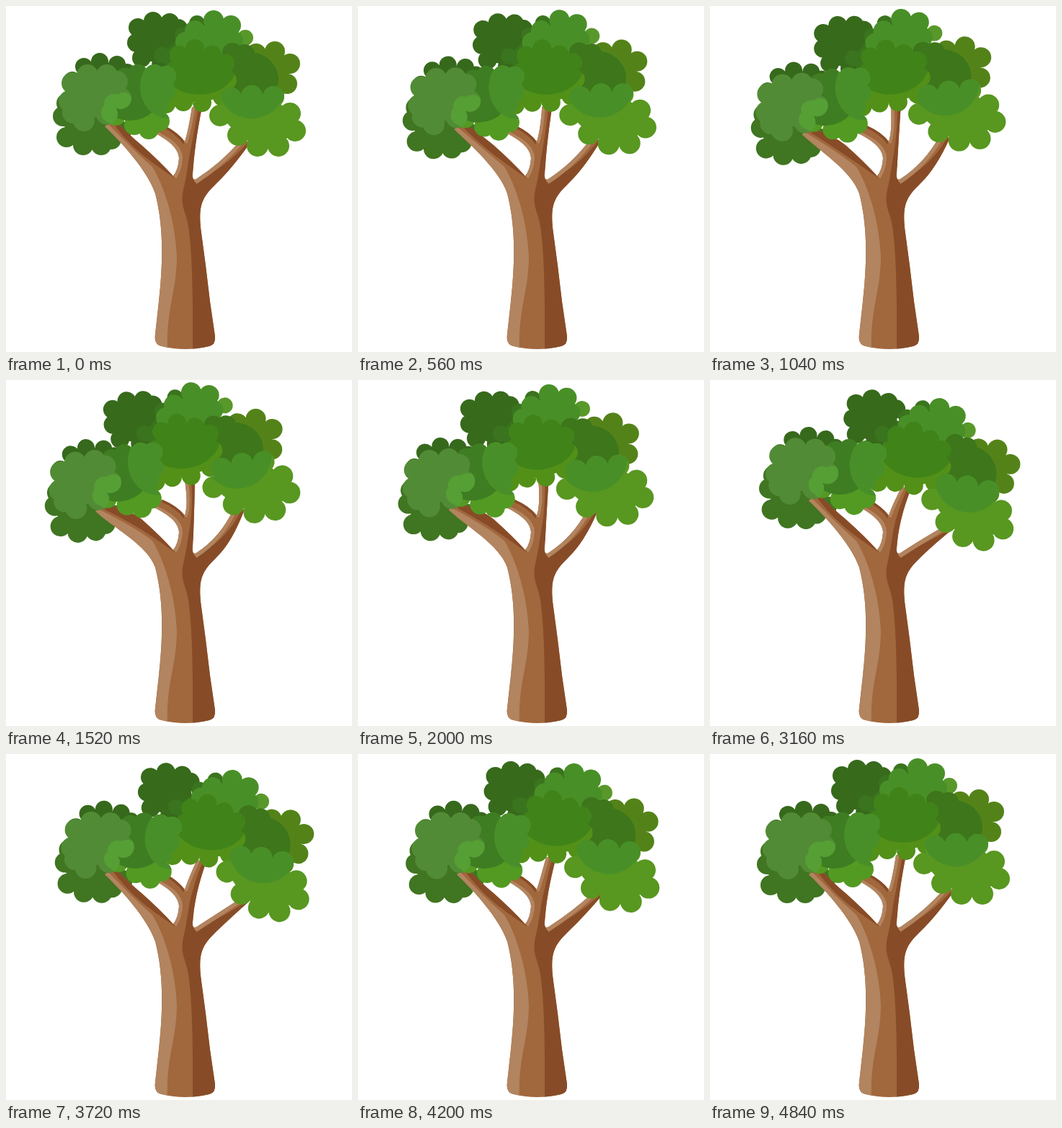
These frames come from a looping animation (480 by 480 pixels, 5 s). An HTML page with a canvas:

```html
<!DOCTYPE html>
<html lang="en">
<head>
<meta charset="utf-8">
<title>Swaying tree</title>
<style>
  html, body { margin: 0; width: 100%; height: 100%; overflow: hidden; background: #fff; }
  canvas { display: block; width: 480px; height: 480px; }
</style>
</head>
<body>
<canvas id="stage" width="480" height="480"></canvas>
<script>
const ctx = document.getElementById('stage').getContext('2d');
const LOOP = 5000, LEFT_AT = 1600, RIGHT_AT = 3300, REST_AT = 4840;

// Leaf mass: lobe centres listed clockwise, all with the same radius.
function cloud(r, ...xy) {
  const path = new Path2D();
  for (let i = 0; i < xy.length; i += 2) path.lineTo(xy[i], xy[i + 1]);
  path.closePath();
  for (let i = 0; i < xy.length; i += 2) {
    path.moveTo(xy[i] + r, xy[i + 1]);
    path.arc(xy[i], xy[i + 1], r, 0, 7);
  }
  return path;
}

function oval(x, y, rx, ry) {
  const path = new Path2D();
  path.ellipse(x, y, rx, ry, 0, 0, 7);
  return path;
}

// Pivot, then [dx, dy, angle] when blown left and right.
const groups = {
  back:   { x: 212, y: 50,  left: [-33, 7, -.13],   right: [18, 6, .12] },
  top:    { x: 288, y: 45,  left: [-28, -3, -.13],  right: [27, 19, .17] },
  centre: { x: 265, y: 90,  left: [-21, 0, -.13],   right: [17, 12, .13] },
  right:  { x: 362, y: 90,  left: [-23, -8, -.13],  right: [22, 32, .17] },
  low:    { x: 349, y: 160, left: [-9, -10, -.13],  right: [9, 24, .2] },
  middle: { x: 185, y: 135, left: [-14, 8, -.12],   right: [6, 1, .1] },
  left:   { x: 118, y: 138, left: [-13, 18, -.1],   right: [4, -1, .05] }
};

const leaves = {
  back: cloud(13, 183,30, 204,21, 227,23, 239,31, 245,60, 215,82, 188,72, 181,51),
  topBack: cloud(11, 216,68, 245,40, 265,24, 300,30, 300,100, 225,95),
  topSide: cloud(11, 300,30, 332,44, 318,70),
  top: cloud(14, 249,50, 262,34, 288,20, 312,27, 315,48, 315,70, 280,90, 245,72),
  right: cloud(14, 330,70, 347,66, 373,63, 394,80, 390,108, 372,125, 320,120),
  rightShade: cloud(14, 314,65, 331,67, 338,95, 314,105),
  centre: cloud(13, 234,90, 240,68, 262,59, 286,68, 304,80, 307,103, 300,126,
    272,134, 246,133, 222,136, 205,120),
  low: cloud(15, 297,152, 312,128, 341,125, 371,126, 394,149, 401,173, 378,194, 349,194, 322,179),
  middle: cloud(14, 146,140, 165,100, 183,95, 206,95, 222,97, 221,118, 212,135,
    213,160, 198,171, 178,165, 152,152),
  leftTop: cloud(12, 92,103, 108,84, 130,77, 154,81, 168,92, 140,120, 100,125),
  leftLow: cloud(14, 79,153, 84,135, 110,130, 150,150, 160,174, 146,185, 132,193, 107,193, 84,182),
  left: cloud(15, 88,132, 92,107, 113,96, 140,96, 154,105, 159,128, 140,150, 108,159, 93,148)
};
leaves.rightShade.addPath(oval(338, 102, 40, 38));

let l = 0, r = 0;   // weights of the left and right poses

const mix = (a, b) => a * l + b * r;

function pose(name) {
  const g = groups[name];
  const [dx, dy, angle] = g.left.map((v, i) => mix(v, g.right[i]));
  ctx.setTransform(1, 0, 0, 1, 0, 0);
  ctx.translate(g.x + dx, g.y + dy);
  ctx.rotate(angle);
  ctx.translate(-g.x, -g.y);
}

function paint(group, path, color) {
  ctx.save();
  pose(group);
  ctx.fillStyle = color;
  ctx.fill(path);
  ctx.restore();
}

function overlap(group, path, otherGroup, other, color) {
  ctx.save();
  pose(group);
  ctx.clip(path);
  paint(otherGroup, other, color);
  ctx.restore();
}

function drawTrunk() {
  const tip = (x, y, lx, ly, rx, ry) => (px, py) => `${px + mix(lx, rx)} ${py + mix(ly, ry)} `;
  const a = tip(0, 0, -13, 15, 0, 0), b = tip(0, 0, -3, 0, 1, 0),
        c = tip(0, 0, -10, 0, 8, 9), d = tip(0, 0, -9, -9, 1, 16);
  const outline = new Path2D(
    `M${a(137, 167)}C${a(161, 190)} 196 228 207 260 C220 310 217 365 212 410 L207 455
     Q205 470 216 472 Q248 480 282 472 Q291 470 290 458
     L283 410 L277 360 L271 315 C266 275 272 266 292 246 Q314 225 ${d(340, 188)}
     L${d(325, 187)}Q298 218 264 240 Q259 243 259 235 Q261 195 ${c(272, 140)}
     L${c(258, 140)}Q253 173 248 188 Q238 175 ${b(220, 166)}
     L${b(202, 174)}C230 188 239 199 240 211 Q239 227 232 236
     Q214 216 188 193 Q172 180 ${a(151, 158)}Z`);
  ctx.save();
  ctx.fillStyle = '#a1673d';
  ctx.fill(outline);
  ctx.clip(outline);

  ctx.fillStyle = '#874c27';
  ctx.fill(new Path2D(
    `M${c(267, 140)}Q260 180 254 210 Q250 238 246 255 C241 278 250 285 253 306
     Q260 350 259 480 L300 480 L300 300 L${d(350, 195)}L${d(335, 190)}Q307 222 262 245
     L258 235 L${c(280, 140)}Z`));
  ctx.fill(new Path2D(
    `M${a(151, 158)}L${a(150, 165)}Q175 198 207 220 L234 239 L234 230 L190 185 Z`));

  ctx.fillStyle = '#b2845f';
  ctx.fill(new Path2D(
    `M${a(130, 165)}L${a(143, 165)}Q184 207 203 223 C224 258 236 310 237 350
     C236 400 222 420 224 480 L190 480 L190 250 Z`));

  const line = (path, color, width) => {
    ctx.strokeStyle = color;
    ctx.lineWidth = width;
    ctx.stroke(new Path2D(path));
  };
  line(`M${b(202, 175)}C231 188 241 199 241 211 Q240 227 233 237`, '#b2845f', 8);
  line(`M${b(220, 167)}Q238 176 248 190`, '#874c27', 5);
  line(`M${c(260, 140)}Q255 173 249 190`, '#b2845f', 5);
  line(`M${d(326, 187)}Q299 219 262 243`, '#b2845f', 9);
  ctx.restore();
}

function drawTree() {
  ctx.setTransform(1, 0, 0, 1, 0, 0);
  ctx.fillStyle = '#fff';
  ctx.fillRect(0, 0, 480, 480);

  paint('left', leaves.leftTop, '#37691c');
  paint('left', leaves.leftLow, '#407521');
  drawTrunk();

  paint('back', leaves.back, '#376a1b');
  paint('top', leaves.topBack, '#3a741e');
  paint('top', leaves.topSide, '#58982a');
  paint('right', leaves.right, '#538318');
  paint('top', leaves.top, '#498f28');
  paint('right', leaves.rightShade, '#3d761b');

  paint('centre', leaves.centre, '#529018');
  overlap('centre', leaves.centre, 'centre', oval(268, 82, 52, 41), '#408319');

  paint('low', leaves.low, '#589720');
  overlap('low', leaves.low, 'right', oval(341, 108, 48, 48), '#488f28');

  paint('middle', leaves.middle, '#539a22');
  overlap('middle', leaves.middle, 'middle', oval(172, 116, 45, 43), '#3e7d22');
  overlap('middle', leaves.middle, 'middle', oval(224, 112, 38, 44), '#488f29');

  paint('left', leaves.left, '#528b35');
  overlap('left', leaves.left, 'middle',
    cloud(14, 146,148, 150,136, 163,134, 185,134, 185,165, 152,152), '#559f35');
}

function frame(now) {
  const t = now % LOOP;
  const ease = (from, to) => (1 - Math.cos(Math.PI * Math.min(1, (t - from) / (to - from)))) / 2;
  if (t < LEFT_AT) {
    l = ease(0, LEFT_AT);
    r = 0;
  } else if (t < RIGHT_AT) {
    r = ease(LEFT_AT, RIGHT_AT);
    l = 1 - r;
  } else {
    l = 0;
    r = 1 - ease(RIGHT_AT, REST_AT);
  }
  drawTree();
  requestAnimationFrame(frame);
}

const start = performance.now();
const tick = () => frame(Math.max(0, performance.now() - start));
requestAnimationFrame(function loop() {
  tick();
});
</script>
</body>
</html>
```
